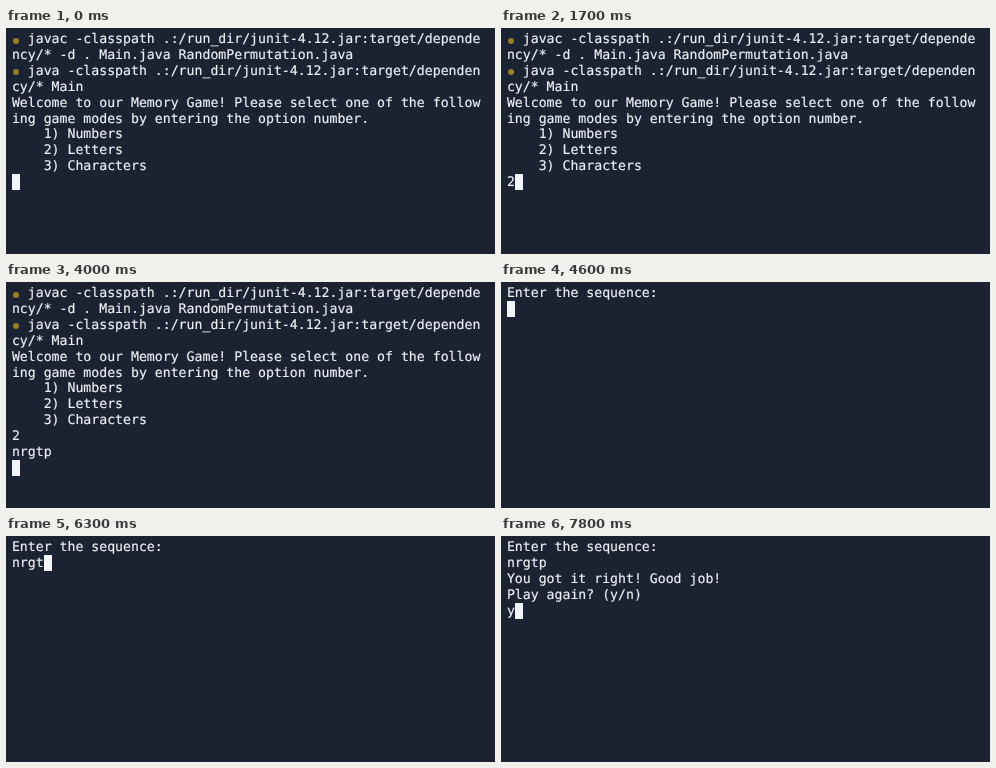
An HTML page for the animation above (8000 ms loop, 489 px wide and 226 px high).

```html
<!DOCTYPE html>
<html lang="en">
<head>
<meta charset="utf-8">
<title>Memory game terminal</title>
<style>
  html, body { margin: 0; width: 100%; height: 100%; overflow: hidden; background: #1b2232; }
  #term { position: absolute; left: 0; top: 0; width: 489px; height: 226px; overflow: hidden; }
  #text {
    position: absolute; left: 5.9px; top: 4.3px; margin: 0; white-space: pre;
    font: 13.2px/15.84px "DejaVu Sans Mono", monospace;
    text-rendering: geometricPrecision; font-variant-ligatures: none;
    color: #eef1f5; -webkit-text-stroke: 0.2px #eef1f5;
  }
  #cursor { position: absolute; width: 8px; height: 16px; background: #f1f4f8; }
  .mark { position: absolute; left: 7px; width: 6px; height: 6px; border-radius: 50%; background: #95802a; }
</style>
</head>
<body>
<div id="term">
  <div class="mark" style="top:10px"></div>
  <div class="mark" style="top:41px"></div>
  <pre id="text"></pre>
  <div id="cursor"></div>
</div>
<script>
  const LOOP = 8000, LEFT = 5.9, TOP = 3.3, COL = 7.947, ROW = 15.84;
  const menu = [
    '  javac -classpath .:/run_dir/junit-4.12.jar:target/depende',
    'ncy/* -d . Main.java RandomPermutation.java',
    '  java -classpath .:/run_dir/junit-4.12.jar:target/dependen',
    'cy/* Main',
    'Welcome to our Memory Game! Please select one of the follow',
    'ing game modes by entering the option number.',
    '    1) Numbers',
    '    2) Letters',
    '    3) Characters',
    ''
  ].join('\n');
  const ask = 'Enter the sequence:\n';
  const again = ask + 'nrgtp\nYou got it right! Good job!\nPlay again? (y/n)\n';

  // [start time, screen contents]; the cursor follows the last character
  const steps = [
    [0, menu],
    [1700, menu + '2'],
    [2300, menu + '2\nnrgtp\n'],
    [4600, ask],
    [5000, ask + 'n'],
    [5600, ask + 'nr'],
    [5900, ask + 'nrg'],
    [6200, ask + 'nrgt'],
    [6400, ask + 'nrgtp'],
    [6600, again],
    [7800, again + 'y']
  ];

  const text = document.getElementById('text');
  const cursor = document.getElementById('cursor');
  const marks = document.querySelectorAll('.mark');
  let shown = null;

  function show(content) {
    if (content === shown) return;
    shown = content;
    text.textContent = content;
    const lines = content.split('\n');
    const row = lines.length - 1;
    cursor.style.left = Math.round(LEFT + lines[row].length * COL) + 'px';
    cursor.style.top = Math.round(TOP + row * ROW) + 'px';
    const prompt = content.startsWith(menu);
    marks.forEach(m => { m.style.display = prompt ? 'block' : 'none'; });
  }

  const start = performance.now();
  function tick(now) {
    const t = Math.max(0, now - start) % LOOP;
    show(steps.filter(s => s[0] <= t).pop()[1]);
    requestAnimationFrame(tick);
  }
  tick(start);
</script>
</body>
</html>
```
